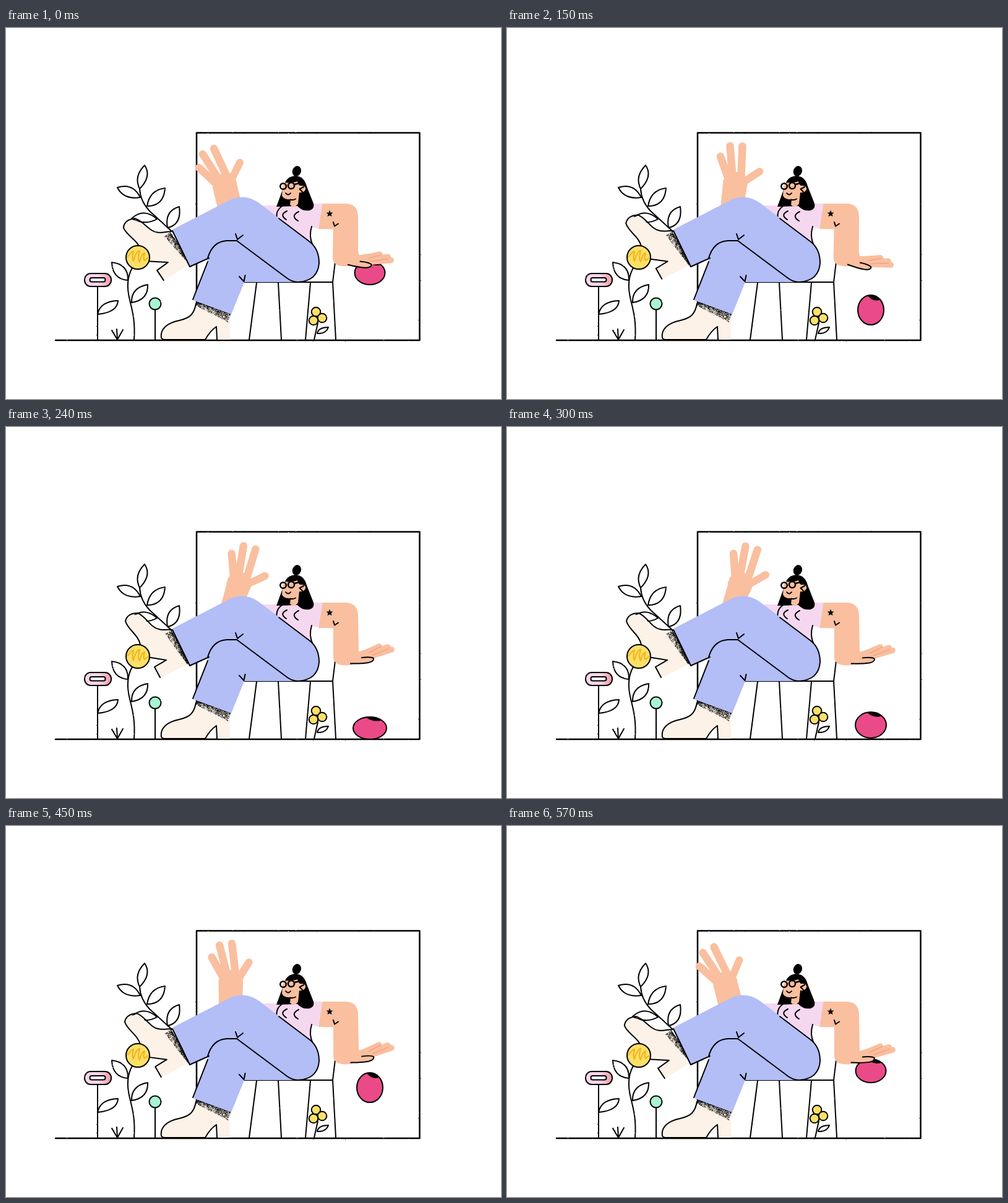
An HTML page that plays this animation: 800 by 600 pixels, repeating every 0.6 s.

```html
<!DOCTYPE html>
<html lang="en">
<head>
<meta charset="utf-8">
<title>Waving and bouncing</title>
<style>
  html, body { margin: 0; width: 100%; height: 100%; overflow: hidden; background: #fff; }
  svg { display: block; width: 800px; height: 600px; }
  .line { fill: none; stroke: #000; stroke-width: 2; stroke-linecap: round; stroke-linejoin: round; }
  .bold { stroke-width: 2.5; }
  .leaf { fill: #fff; }
  .skin { fill: #f9bf9f; }
  .finger { fill: none; stroke: #f9bf9f; stroke-linecap: round; }
  .crease { fill: none; stroke: #ee9d76; stroke-width: 1.2; stroke-linecap: round; }
  .cream { fill: #fdf2e7; }
  .pants { fill: #b3bdf6; }
  .shirt { fill: #f5d8ef; }
  .yellow { fill: #fbe068; }
</style>
</head>
<body>
<svg viewBox="0 0 800 600">
  <defs>
    <filter id="rough" filterUnits="userSpaceOnUse" x="70" y="160" width="610" height="355" color-interpolation-filters="sRGB">
      <feTurbulence type="fractalNoise" baseFrequency=".5" numOctaves="1" seed="4"/>
      <feDisplacementMap in="SourceGraphic" scale="1.8" xChannelSelector="R" yChannelSelector="G"/>
    </filter>
    <linearGradient id="blush">
      <stop offset=".55" stop-color="#f9d5ea"/>
      <stop offset="1" stop-color="#ee9aa6"/>
    </linearGradient>
  </defs>

  <!-- frame, ground, plants, chair -->
  <g class="line" filter="url(#rough)">
    <path class="bold" d="M308 169.500H668.500V505H308ZM80 505H668"/>
    <path d="M216 260Q217 280 232 296L268 329"/>
    <path class="leaf" d="M216 260Q206 240 224 222Q236 240 216 260ZM180 258Q205 250 217 274Q190 278 180 258ZM257 259Q255 288 228 288Q232 262 257 259ZM280 289Q284 318 261 323Q256 296 280 289ZM203 308Q223 290 244 309Q225 320 203 308Z"/>
    <path d="M204 388C196 402 195 420 200 440S209 475 207 504"/>
    <path class="leaf" d="M171 379Q198 382 197 408Q172 406 171 379ZM229 415Q230 440 203 444Q202 420 229 415Z"/>
    <path d="M148 418V504M241 456V504M180 504L179 487M180 504L171 489M180 504L189 488"/>
    <path class="leaf" d="M181 441Q180 460 148 463Q152 442 181 441Z"/>
    <rect x="127" y="397" width="43" height="21" rx="10" fill="url(#blush)"/>
    <rect x="135.500" y="404" width="25" height="6.500" rx="3" fill="#fff"/>
    <circle cx="241" cy="446" r="9.500" fill="#a8f4d0"/>
    <path d="M385 411H528L533 504M532.500 374L528 411M405 412L393 504M440 412L445 504M492 412L484 504"/>
    <path d="M504 477L498 504"/>
    <path class="leaf" d="M503 494Q505 484 521 484Q517 495 503 494Z"/>
    <g class="yellow">
      <circle cx="501" cy="459" r="7.300"/>
      <circle cx="497" cy="473" r="7.300"/>
      <circle cx="511" cy="469" r="7.300"/>
    </g>
  </g>

  <!-- raised shoe -->
  <g id="shoe">
    <path class="cream" d="M193 314C196 306 204 303 212 304C226 309 234 325 247 327L266 329L297 382L249 406L240 388L259 377L228 372L217 352C214 336 197 328 193 314Z"/>
    <path class="line" d="M217 352C214 336 197 328 193 314C195 305 203 301 213 301C226 306 234 325 247 327C254 329 262 327 268 328M228 372L259 377L240 388L249 405"/>
    <path id="cuffA"/>
  </g>
  <circle class="line" cx="213" cy="371" r="19" style="fill:#fbe068"/>
  <path fill="none" stroke="#f4b41c" stroke-width="2.200" stroke-linejoin="round" d="M196 371Q202 362 206 361Q203 372 206 377Q210 361 216 360Q212 374 216 378Q219 365 224 364Q221 373 224 376L230 371"/>

  <!-- waving arm -->
  <path id="forearm" class="skin"/>
  <g id="wave">
    <path class="skin" d="M334 258L336 242L356 232L368 240L372 247L366 270L338 268Z"/>
    <path class="finger" stroke-width="12.500" d="M312 226L341 253M318 204L346 248M336 195L357 240"/>
    <path id="thumb" class="finger" stroke-width="12" d="M377 217L364 246"/>
  </g>

  <!-- torso and head -->
  <path class="shirt" d="M405 287L440 287Q466 292 497 284H512L505 324L493 322Q490 338 498 354L440 312L405 300Z"/>
  <path d="M437 289L449 256Q452 240 468 239Q482 240 486 256L497 284Q499 292 491 295Q479 297 471 288Z"/>
  <ellipse cx="470" cy="231.500" rx="7" ry="8.500" transform="rotate(20 470 231)"/>
  <path class="skin" d="M450 250Q463 251 471 248Q473 256 477 255Q485 255 484 261Q482 267 474 266L472 284Q466 293 459 286L460 277Q449 278 446 271L447 256Z"/>
  <path class="line" d="M459 277.500Q464 279 468 276.500M452 267Q456 272 460 267M481 257L474.500 260.500L479 265M454 296Q441 302 453 310M473 297Q459 304 472 312M446 288Q436 295 437.500 307M494 321Q489 337 496 352"/>
  <g class="line bold">
    <circle cx="448" cy="256" r="4.800"/>
    <circle cx="461" cy="255" r="5"/>
    <path d="M466 253L474 251"/>
  </g>

  <!-- lower shoe -->
  <path class="cream" d="M307 446C304 462 298 469 280 473C260 477 249 487 251 504H322C328 493 335 487 340 484L341 504H362V463Z"/>
  <path class="line" d="M307 446C304 462 298 469 280 473C260 477 249 487 251 501Q252 504 258 504H322C328 493 334 487 340 483L341 504"/>
  <path id="cuffB"/>

  <!-- trousers -->
  <path class="pants" d="M302 440C312 415 321 390 328 368Q335 344 360 344L400 330L470 411H385L364 463Z"/>
  <path class="pants" d="M269 326L362 278Q386 267 409 283L490 345Q506 357 506 380Q503 411 470 411Q462 411 452 403L374 344L298 387Z"/>
  <path class="line" d="M269 328L297 386L328 372M302 439L326 378M326 372Q334 345 357 344L373 344L452 403Q462 411 472 411Q504 409 506 380Q506 357 490 345L441 308M371 333L374 342L383 335M377 402L384.500 410L386.500 400"/>

  <!-- ball -->
  <g id="ball">
    <circle r="1" fill="#ea4a88"/>
    <path d="M-.25 -.97A1 1 0 0 1 .72 -.69Q.2 -.5 -.25 -.97Z"/>
    <circle class="line" r="1" vector-effect="non-scaling-stroke"/>
  </g>

  <!-- resting arm -->
  <path class="skin" d="M511.500 284H548Q569 284 569 306V326L505 325Z"/>
  <g id="lower">
    <path class="skin" d="M569 306L570 362L574 376L558 385Q529 388 529 372V318Z"/>
    <g id="hand">
      <path class="skin" d="M550 362L572 363L588 357L600 366L592 379L575 383L553 384Z"/>
      <path class="finger" stroke-width="9.500" d="M575 368L603 355M580 370L617 356M582 373L623 360"/>
      <path class="crease" d="M587 365L606 355M592 369L618 359"/>
      <path class="line" d="M557 382.500Q574 383 586 381Q595 379 594 374Q590 371 575 373"/>
    </g>
  </g>
  <path d="M523 294.500L524.500 298.500L528.500 298.500L525.500 301L526.500 305L523 303L519.500 305L520.500 301L517.500 298.500L521.500 298.500Z"/>
  <path class="line" d="M529 314L531 320.500L537 316.500"/>
</svg>
<script>
const LOOP = 600, STEP = 30;
const get = id => document.getElementById(id);

// Each key is [time, value, ...]; the last one leads back to the first.
const swingKeys = [[0, 0], [90, 14], [150, 27.5], [240, 42], [300, 43], [360, 39], [450, 18], [510, 5], [570, -1]];
const handKeys = [[0, 12], [30, 21], [60, 26], [90, 26], [150, 18], [240, 0], [360, 2], [450, -1], [570, 1.5]];
const shoeKeys = [[0, 0], [90, 2.2], [150, 4.5], [240, 5.8], [360, 5.8], [450, 4], [510, 2], [570, 0]];
const ballKeys = [ // time, centre y, rx, ry
  [0, 396, 24.5, 19], [90, 431, 22.3, 22.8], [150, 456, 21, 24], [210, 481, 22, 23.5],
  [240, 487, 27, 18], [270, 488, 27, 17], [300, 482, 25, 21], [360, 463, 22.3, 22.8],
  [450, 423, 21, 24], [510, 402, 22, 22.5], [570, 396, 24.5, 19]
];

function at(keys, t) {
  let i = keys.length - 1;
  while (keys[i][0] > t) i--;
  const a = keys[i], b = keys[i + 1] || [LOOP, ...keys[0].slice(1)];
  const u = (t - a[0]) / (b[0] - a[0]);
  return a.slice(1).map((v, k) => v + (b[k + 1] - v) * u);
}

// Grainy shadow that thins out away from the line a-b
function grain(id, ax, ay, bx, by, depthA, depthB) {
  let seed = 7, d = "";
  const rnd = () => (seed = seed * 16807 % 2147483647) / 2147483647;
  const len = Math.hypot(bx - ax, by - ay);
  const nx = -(by - ay) / len, ny = (bx - ax) / len;
  for (let i = 0; i < 900; i++) {
    const u = rnd(), v = rnd() ** 2 * (depthA + (depthB - depthA) * u);
    d += `M${(ax + (bx - ax) * u + nx * v).toFixed(1)} ${(ay + (by - ay) * u + ny * v).toFixed(1)}h.8v.8h-.8z`;
  }
  get(id).setAttribute("d", d);
}
grain("cuffA", 267, 329, 296, 381, 12, 4);
grain("cuffB", 308, 442, 363, 462, 7, 14);

const pivot = [366, 284];
function turned(x, y, deg) {
  const a = deg * Math.PI / 180, c = Math.cos(a), s = Math.sin(a);
  const dx = x - pivot[0], dy = y - pivot[1];
  return [pivot[0] + dx * c - dy * s, pivot[1] + dx * s + dy * c];
}
const move = (id, value) => get(id).setAttribute("transform", value);

function draw(t) {
  const [swing] = at(swingKeys, t);
  move("wave", `rotate(${swing} ${pivot})`);
  move("thumb", `rotate(${-2.5 + 9 * Math.cos((t - 100) / LOOP * 2 * Math.PI)} 364 246)`);
  get("forearm").setAttribute("d",
    `M${turned(334, 258, swing)}L${turned(372, 247, swing)}L382 290L344 300Z`);

  const [bend] = at(handKeys, t);
  move("lower", `rotate(${bend * .07} 549 305)`);
  move("hand", `rotate(${bend} 555 368)`);
  move("shoe", `rotate(${at(shoeKeys, t)[0] - 5.8} 280 350)`);
  const [y, rx, ry] = at(ballKeys, t);
  move("ball", `translate(588 ${y}) scale(${rx} ${ry})`);
}

const start = performance.now();
function tick() {
  const t = (performance.now() - start) % LOOP;
  draw(Math.floor(t / STEP) * STEP);
  requestAnimationFrame(tick);
}
tick();
</script>
</body>
</html>
```
